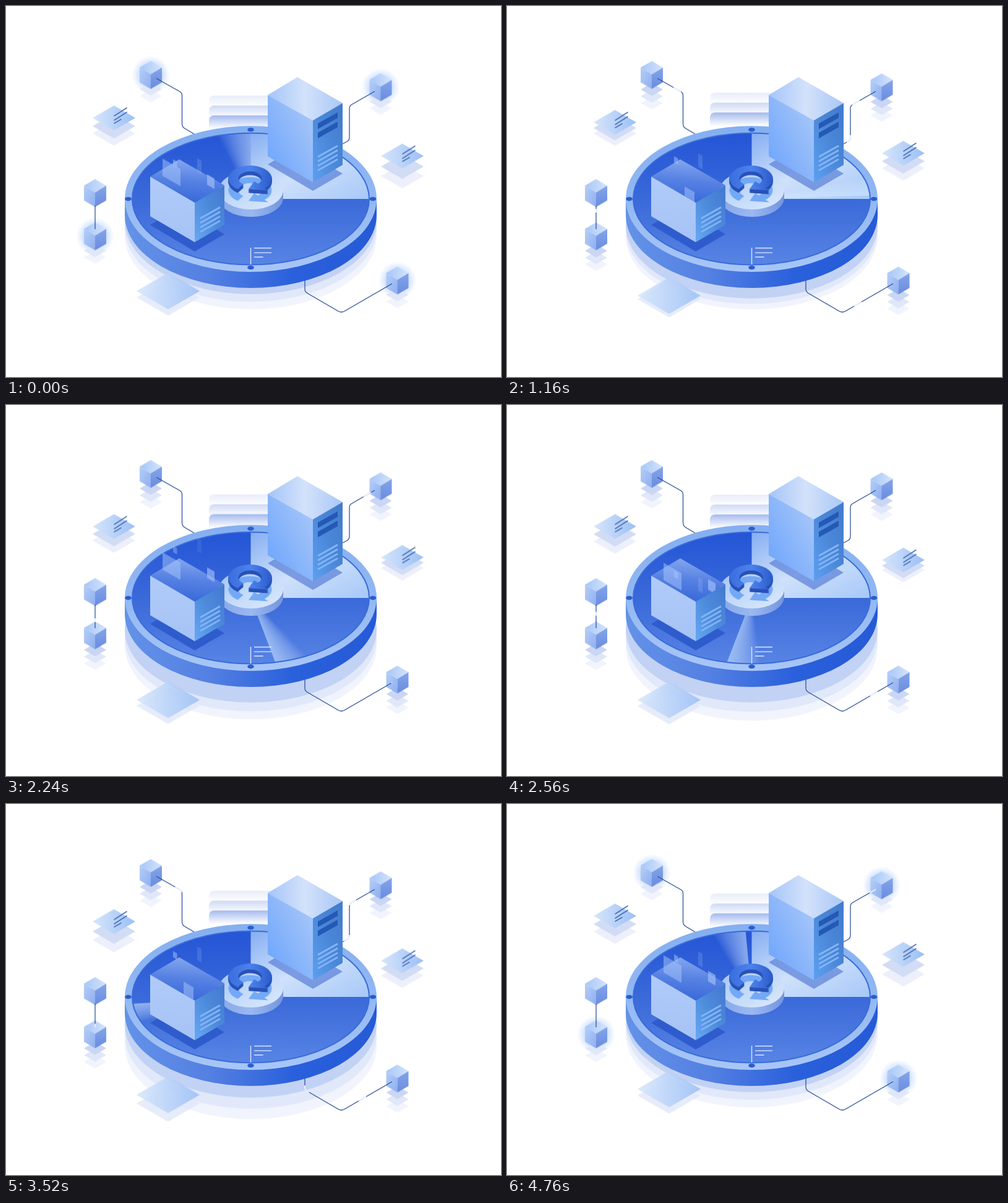
These frames come from a looping animation (800 px wide and 600 px high, 4.8 s). An HTML page:

```html
<!DOCTYPE html>
<html lang="en">
<head>
<meta charset="utf-8">
<title>Data platform</title>
<style>
  html, body { margin: 0; width: 100%; height: 100%; overflow: hidden; background: #fff; }
  svg { display: block; width: 800px; height: 600px; }
  .bob { animation: bob 2.4s cubic-bezier(.62, 0, .38, 1) infinite alternate; }
  .hover { animation: bob 1.2s ease-in-out infinite alternate; }
  .fall { animation: fall 2.4s linear infinite; }
  .pulse { animation: pulse 2.4s linear infinite; fill: none; stroke: #e6edfc; stroke-width: 2.2; }
  .beam { animation: turn 4.8s linear infinite; }
  .spin { animation: spin 4.8s infinite; }
  .drop { animation: drop 1.6s ease-in-out infinite; }
  .glow { animation: glow 1.6s linear infinite; }
  .answer { animation: answer 1.6s linear infinite; }
  .wire { fill: none; stroke: #2a4f98; stroke-width: 1.25; }
  @keyframes bob { to { transform: translateY(var(--d)); } }
  @keyframes fall {
    0% { transform: translateY(0); opacity: 0; }
    20% { opacity: var(--o); }
    100% { transform: translateY(var(--d)); opacity: var(--o); }
  }
  @keyframes pulse { from { stroke-dashoffset: var(--a); } to { stroke-dashoffset: var(--b); } }
  @keyframes turn { to { transform: rotate(360deg); } }
  @keyframes spin {
    0% { transform: rotate(0deg); animation-timing-function: cubic-bezier(.62, 0, .38, 1); }
    21.5%, 100% { transform: rotate(360deg); }
  }
  @keyframes drop {
    0%, 94%, 100% { transform: translateY(0); }
    25%, 72.5% { transform: translateY(11.5px); }
  }
  @keyframes glow { 0%, 97%, 100% { opacity: 1; } 18%, 86% { opacity: 0; } }
  @keyframes answer { 0%, 73%, 93%, 100% { opacity: 0; } 82% { opacity: 1; } }
</style>
</head>
<body>
<svg viewBox="0 0 800 600" xmlns="http://www.w3.org/2000/svg">
  <defs id="defs">
    <radialGradient id="halo">
      <stop offset=".45" stop-color="#8fb8ff" stop-opacity=".6"/>
      <stop offset="1" stop-color="#a9c9ff" stop-opacity="0"/>
    </radialGradient>
    <clipPath id="mouth"><path d="M200 100H400V290H353L305 318L233 276H200Z"/></clipPath>
  </defs>

  <g id="shadows"></g>
  <g id="stack"></g>
  <g id="sheets"></g>
  <g id="cubes"></g>
  <g id="wires"></g>

  <g id="disc">
    <path d="M192 312V338A203.5 118 0 0 0 599 338V312Z" fill="url(#side)"/>
    <ellipse cx="395.5" cy="312" rx="203.5" ry="118" fill="url(#rim)"/>
    <ellipse cx="395.5" cy="312" rx="191.5" ry="106.5" fill="url(#face)"/>
    <path d="M395.5 312V205.5A191.5 106.5 0 0 1 587 312Z" fill="url(#quarter)"/>
    <g transform="translate(395.5 312) scale(1 .556)"><g id="beam" class="beam" fill="#d3e2ff"></g></g>
    <ellipse cx="395.5" cy="312" rx="191.5" ry="106.5" fill="none" stroke="#3a6bd9" stroke-width="2"/>
    <g fill="#2a5dd0">
      <ellipse cx="395.5" cy="200" rx="5.3" ry="3.2"/>
      <ellipse cx="395.5" cy="423" rx="5.3" ry="3.2"/>
      <ellipse cx="197.5" cy="312" rx="5.3" ry="3.2"/>
      <ellipse cx="593" cy="312" rx="5.3" ry="3.2"/>
    </g>
    <g stroke="#dbe7fd" fill="none">
      <path d="M395.5 391V418" stroke-width="1.4"/>
      <path d="M401 391.5H429M401 406H415.500" stroke-width="1.3"/>
      <path d="M401 399H429" stroke-width="2" stroke="#a9c3f6"/>
    </g>
  </g>

  <g id="hub">
    <path d="M344 298V310A52 31 0 0 0 448 310V298Z" fill="url(#hubSide)"/>
    <ellipse cx="396" cy="298" rx="52" ry="31" fill="url(#hubTop)"/>
    <g id="arrows"></g>
  </g>

  <g id="server">
    <path d="M423 256L470 228L544 271L496 299Z" fill="#5f85da" opacity=".75"/>
    <path d="M423 144L471 115L544 157L496 185Z" fill="url(#serverTop)"/>
    <path d="M423 144L496 185V285L423 243Z" fill="url(#serverLeft)"/>
    <path d="M496 185L544 157V257L496 285Z" fill="url(#serverRight)"/>
    <path d="M504 190L536 172V181L504 199ZM504 205L536 187V196L504 214Z" fill="#2459b5"/>
    <g id="serverLines" stroke="#86b6f5" stroke-width="2.8"></g>
  </g>

  <g id="box">
    <path d="M233 354L280 326L353 369L305 397Z" fill="#2f5ccd"/>
    <path d="M233 276L280 248L353 290L305 318Z" fill="url(#boxTop)"/>
    <path d="M233 276L305 318V382L233 340Z" fill="url(#boxLeft)"/>
    <path d="M305 318L353 290V354L305 382Z" fill="url(#boxRight)"/>
    <g id="boxLines" stroke="#84b5f4" stroke-width="2.8"></g>
    <g id="panels" clip-path="url(#mouth)"></g>
  </g>
</svg>

<script>
  const $ = id => document.getElementById(id);
  const add = (id, markup) => $(id).insertAdjacentHTML('beforeend', markup);
  const times = (n, fn) => Array.from({ length: n }, (_, i) => fn(i)).join('');

  // Linear gradients: id, direction, then evenly spaced colours.
  function gradient(id, [x1, y1, x2, y2], ...colours) {
    const stops = colours.map((c, i) =>
      `<stop offset="${i / (colours.length - 1)}" stop-color="${c}"/>`).join('');
    add('defs', `<linearGradient id="${id}" x1="${x1}" y1="${y1}" x2="${x2}" y2="${y2}">${stops}</linearGradient>`);
  }
  const across = [0, 0, 1, 0], down = [0, 0, 0, 1], diagonal = [0, 0, 1, 1], rising = [0, 1, 1, 0];
  gradient('side', across, '#6392e8', '#5480e2', '#2a60dc', '#265ad6');
  gradient('rim', down, '#84aff0', '#92b8f3', '#a8c6f7');
  gradient('face', down, '#2455d6', '#3a69d9', '#5884e4');
  gradient('quarter', diagonal, '#85aef2', '#cfe1fb', '#a6c8f8');
  gradient('hubSide', across, '#86a8e8', '#9bb8f0', '#7395df');
  gradient('hubTop', diagonal, '#9fc1f5', '#c3daf9', '#dceafc');
  gradient('serverTop', across, '#a4c5f8', '#d3e2fb', '#a9c7f6');
  gradient('serverLeft', rising, '#68a2fd', '#8bb6fa', '#aecbf8');
  gradient('serverRight', [1, 0, 0, 1], '#427acb', '#4b88d9', '#5da0f0');
  gradient('boxTop', [.6, 0, .45, 1], '#86a8ee', '#5681e3', '#3768d9');
  gradient('boxLeft', down, '#b0cbf8', '#a6c3f6');
  gradient('boxRight', [1, 0, 0, 1], '#4478cf', '#4d8bdc', '#68a8f3');
  gradient('sheet', across, '#d6e6fb', '#bad3f8', '#9bbff5');
  gradient('cubeTop', across, '#a5c6f8', '#d5e4fb');
  gradient('cubeLeft', diagonal, '#b6cff8', '#8eaeef');
  gradient('cubeRight', down, '#84a5ea', '#6a8cdf');
  gradient('icon', across, '#3b6ede', '#4c82ec', '#2c5bcb');
  ['#e9edfa', '#cfdaf5', '#a5bbee'].forEach((c, i) => gradient('bar' + i, down, c, '#fff'));

  const bob = (dist, delay, inner) =>
    `<g class="bob" style="--d:${dist}px;animation-delay:${delay - 4800}ms">${inner}</g>`;
  const diamond = (x, y, rx, ry, fill, extra = '') =>
    `<path d="M${x - rx} ${y}L${x} ${y - ry}L${x + rx} ${y}L${x} ${y + ry}Z" fill="${fill}" ${extra}/>`;

  // Shadows under the disc, farthest first
  [[59, 22, 550, '#f1f4fd'], [48, 18, 270, '#e0e8fa'], [36, 15, 0, '#c2d2f4']].forEach(([y, d, wait, c]) =>
    add('shadows', bob(d, wait, `<ellipse cx="395.5" cy="${312 + y}" rx="203.5" ry="118" fill="${c}"/>`)));

  add('stack', `<g class="hover" style="--d:-5px;animation-delay:-2300ms">${times(3, i =>
    `<path d="M440 ${145 + 16 * i}H337Q328 ${145 + 16 * i} 328 ${154 + 16 * i}V${163 + 18 * i}H440Z" fill="url(#bar${i})"/>`)}</g>`);

  function paper(x, y, wait) {
    const lines = `<path d="M${x} ${y - 3}l21 -13.500M${x} ${y + 4}l21 -13.500M${x} ${y + 9}l12 -7" stroke="#4a70b8" stroke-width="1.7"/>`;
    add('sheets',
      bob(16, wait + 550, diamond(x, y + 24, 34.5, 20, '#edf0fb')) +
      bob(15, wait + 270, diamond(x, y + 13, 34.5, 20, '#d2dcf5')) +
      bob(15.5, wait, diamond(x, y, 34.5, 20, 'url(#sheet)') + lines));
  }
  paper(174.5, 181, 0);
  paper(640.5, 238, 1000);
  add('sheets',
    bob(16, 300, diamond(262, 471, 51, 29.5, '#dfe6f9', 'opacity=".75"')) +
    bob(16, 0, diamond(262, 461, 51, 29.5, 'url(#sheet)', 'opacity=".88"')));

  function cube(x, y, lead) {
    const tints = ['#f1f4fd', '#e0e7f9', '#cad6f4'];
    const under = lead ? '' : `<g class="drop">${times(3, i =>
      diamond(0, 34 - 11 * i, 18, 10.5, tints[i]))}</g>`;
    add('cubes', `<g transform="translate(${x} ${y})">
      <circle r="31" fill="url(#halo)" class="${lead ? 'answer' : 'glow'}"/>${under}
      <path d="M0 -22.500L18 -12L0 -1L-18 -12Z" fill="url(#cubeTop)"/>
      <path d="M-18 -12L0 -1V22.500L-18 12Z" fill="url(#cubeLeft)"/>
      <path d="M18 -12L0 -1V22.500L18 12Z" fill="url(#cubeRight)"/></g>`);
  }
  cube(144, 302.5, true);
  cube(144, 372.5);
  cube(234, 111.5);
  cube(605.5, 131.5);
  cube(632.5, 444);

  // Pulses: [start length, end length, period, delay, dash]
  function wire(d, pulses) {
    add('wires', `<path class="wire" d="${d}"/>` + pulses.map(([from, to, dur, wait, dash = 14]) =>
      `<path class="pulse" d="${d}" stroke-dasharray="${dash} 900" style="--a:${-from}px;--b:${-to}px;` +
      `animation-duration:${dur}ms;animation-delay:${wait}ms"/>`).join(''));
  }
  wire('M243 117L281 138.500Q284.500 140.500 284.500 145V190Q284.500 195 288 197.500L304 207', [[175, -125, 2400, 0]]);
  wire('M596 138L558.500 159.500Q555 161.500 555 166V212Q555 217 551.500 219L543 223.500',
    [[175, -125, 2400, 0], [187, -6, 2400, 0]]);
  wire('M624 449L548 493Q542 497 536 493L487 464.500Q483 462 483 458V443',
    [600, 2230, 3040].map(start => [-14, 610, 4800, start - 4800]));
  wire('M144 361V323', [[-6, 46, 1600, 150 - 1600, 6]]);

  // Sweep: overlapping wedges that end on one sharp edge
  add('beam', times(16, i => {
    const a = (i + 1) * Math.PI / 180, r = 190.5;
    return `<path d="M0 0L${-r * Math.sin(a)} ${-r * Math.cos(a)}A${r} ${r} 0 0 1 0 ${-r}Z" opacity=".048"/>`;
  }));

  // Circular arrow lying in the plane of the disc
  const polar = (r, deg) => {
    const a = deg * Math.PI / 180;
    return `${(r * Math.cos(a)).toFixed(2)} ${(r * Math.sin(a)).toFixed(2)}`;
  };
  const arrow = `M${polar(35, 125)}A35 35 0 1 1 ${polar(35, 48)}L${polar(44, 48)}L${polar(29, 95)}` +
    `L${polar(10, 48)}L${polar(19, 48)}A19 19 0 1 0 ${polar(19, 125)}Z`;
  const ring = (y, fill, extra = '') =>
    `<g transform="translate(394.500 ${y}) scale(1 .6)" ${extra}><path class="spin" d="${arrow}" fill="${fill}"/></g>`;
  add('arrows', ring(298, '#6aa3f5', 'opacity=".9"') +
    times(6, i => ring(285 - i, '#2a52b6')) + ring(279, 'url(#icon)'));

  const slats = (x, y) => times(4, i => `<path d="M${x} ${y + 7.3 * i}l32 -18"/>`);
  add('serverLines', slats(504, 244));
  add('boxLines', slats(314, 343.5));

  // Panels falling into the box
  function panel(x, y, w, h, dist, dur, ago, alpha, slope = .58) {
    add('panels', `<path class="fall" d="M${x} ${y}l${w} ${w * slope}v${h}l${-w} ${-w * slope}Z" fill="#a9c6fb"
      style="--d:${dist}px;--o:${alpha};animation-duration:${dur}ms;animation-delay:${-ago}ms"/>`);
  }
  panel(253, 199, 29, 28, 127, 2400, 900, .5);
  panel(287, 197, 16, 36, 264, 2400, 2100, .5);
  panel(325, 212, 12, 17, 144, 2400, 1000, .6);
  panel(270, 204, 6.5, 10, 150, 1200, 350, .5);
  panel(309, 186, 7, 22, 240, 1200, 300, .2);
  panel(304, 211, 16, 15, 288, 2400, 1100, .22, -.58);
</script>
</body>
</html>
```
